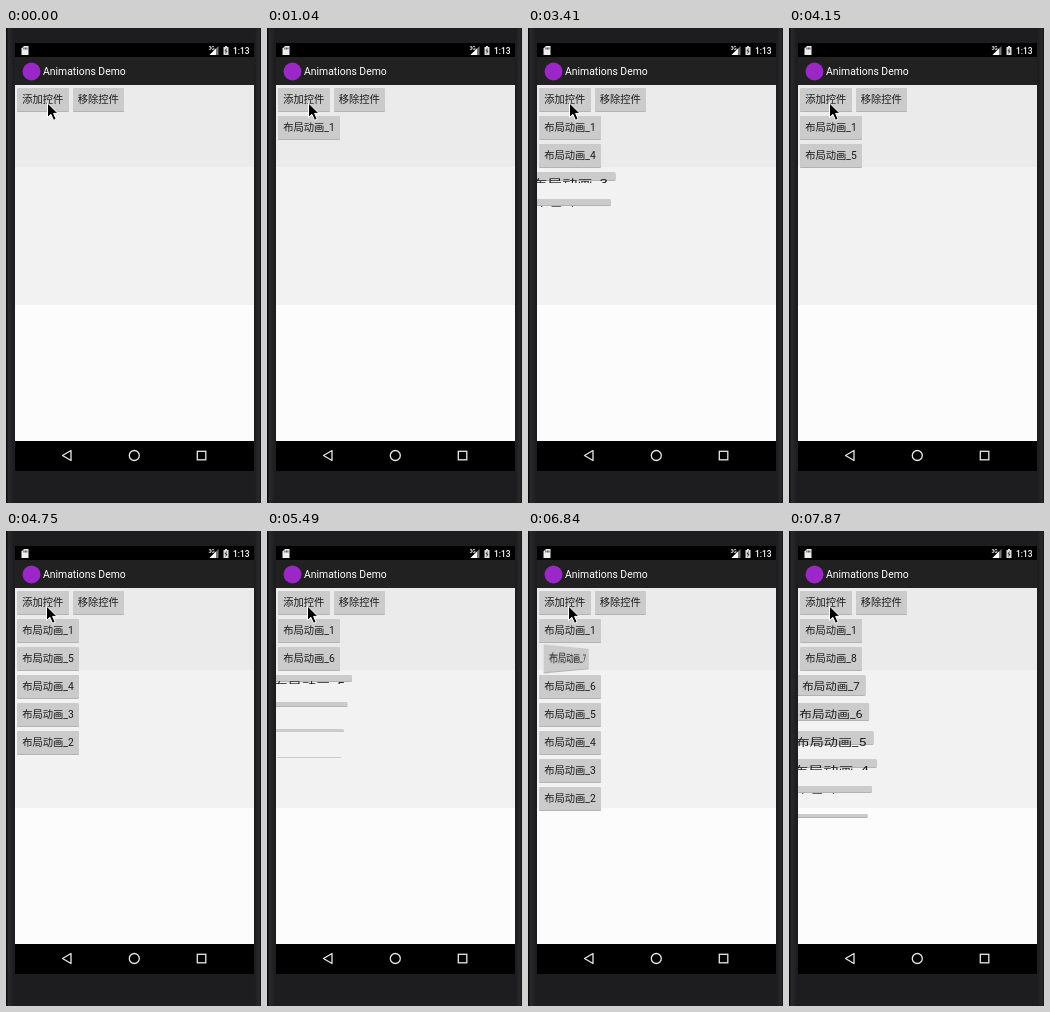
An HTML page that plays this animation: 255 by 475 pixels, repeating every 8000 ms.

```html
<!DOCTYPE html>
<html lang="zh-CN">
<head>
<meta charset="utf-8">
<title>Animations Demo</title>
<style>
  html, body { margin: 0; width: 100%; height: 100%; overflow: hidden; }
  body {
    position: relative;
    background: linear-gradient(90deg, #0c0c0d 0, #0c0c0d 1px, #2a2a2c 2px, #1d1d1f 8px, #1d1d1f 249px, #29292b 253px, #161617 255px);
    font-family: Roboto, "Noto Sans CJK SC", "Noto Sans CJK", sans-serif;
  }
  .box { position: absolute; left: 9px; width: 239px; overflow: hidden; }
  #status { top: 15px; height: 14px; background: #000; }
  #bar { top: 29px; height: 28px; background: #212121; }
  #nav { top: 413px; height: 30px; background: #000; }
  #content {
    top: 57px; height: 356px;
    background: linear-gradient(#ebebeb 82px, #f2f2f2 82px, #f2f2f2 220px, #fcfcfc 220px);
  }
  svg { position: absolute; left: 0; top: 0; }
  #clock, #title { position: absolute; color: #fff; white-space: nowrap; }
  #clock { left: 227px; top: 17px; font-size: 8.4px; line-height: 12px; font-weight: 500; }
  #title { left: 37px; top: 36px; font-size: 10.4px; line-height: 15px; }
  .view { position: absolute; left: 0; width: 66px; height: 28px; overflow: hidden; }
  .face {
    position: absolute; left: 2px; right: 2px; top: 2px; bottom: 3px;
    background: #cbcbcb; border-radius: 1px; box-shadow: 0 1px #b3b3b3;
  }
  .label {
    position: absolute; left: 0; right: 0; top: 6px; height: 15px;
    font-size: 10.3px; line-height: 15px; text-align: center; white-space: nowrap; color: #1a1a1a;
  }
</style>
</head>
<body>
<div class="box" id="status"></div>
<div class="box" id="bar"></div>
<div class="box" id="content"></div>
<div class="box" id="nav"></div>
<div id="clock">1:13</div>
<div id="title">Animations Demo</div>
<svg width="255" height="475" viewBox="0 0 255 475">
  <path d="M18 18h4.5v9h-7v-6.500z" fill="#eee"/>
  <path d="M17.900 19.500v2M19.400 19.500v2M20.900 19.500v2" stroke="#000" stroke-width=".7"/>
  <path d="M212.500 18v9h-9z" fill="#777"/>
  <path d="M210 20.500v6.500h-6.500z" fill="#fff"/>
  <text x="202.500" y="21.500" font-size="5" font-weight="500" fill="#fff">3G</text>
  <path d="M219 18h2v1h1.500v8h-5v-8h1.500z" fill="#ddd"/>
  <path d="M220.500 20.500l-1.500 2.500h2l-1.500 2.500" fill="none" stroke="#000" stroke-width=".7"/>
  <circle cx="25.500" cy="43.500" r="9" fill="#9c27c8"/>
  <g fill="none" stroke="#e8e8e8" stroke-width="1.300">
    <path d="M65 422.500v10l-8.500-5z" stroke-linejoin="round"/>
    <circle cx="128.300" cy="427.500" r="5"/>
    <rect x="191.300" y="423.300" width="8.500" height="8.500"/>
  </g>
  <path id="cursor" d="M0 0V14.500L3.400 11.300L6 17.300L8.700 16.200L6.100 10.400H10.500Z" fill="#000" stroke="#fff"/>
</svg>
<script>
  const LOOP = 8000, STEP = 148.45, ROW = 28, DUR = 300, STAGGER = 30;
  const starts = [435, 1622, 2510, 3240, 4140, 5335, 6379, 7603];
  const LEAD = 40; // a new button shows slightly before its animation clock starts
  const content = document.getElementById('content');
  const cursor = document.getElementById('cursor');

  function addView(text, left, width) {
    const el = document.createElement('div');
    el.className = 'view';
    el.innerHTML = `<div class="face"></div><div class="label">${text}</div>`;
    el.style.cssText = `left:${left}px;top:1px;width:${width}px`;
    content.append(el);
    return el;
  }

  const ease = t => (1 - Math.cos(Math.PI * Math.min(1, Math.max(0, t)))) / 2;

  function place(el, row, height, transform) {
    const face = el.firstChild.style, k = Math.min(1, height / 14);
    el.style.display = height > 0.5 ? 'block' : 'none';
    el.style.top = 1 + row * ROW + 'px';
    el.style.height = height + 'px';
    el.style.transform = transform;
    face.top = 2 * k + 'px';
    face.bottom = 3 * k + 'px';
  }

  addView('添加控件', 0, 55.5);
  addView('移除控件', 55.5, 55.5);
  const views = starts.map((_, i) => addView('布局动画_' + (i + 1), 0, 66));

  function render(time) {
    const t = Math.floor((time + 14) / STEP) * STEP;
    const count = starts.filter(s => t >= s - LEAD).length;
    const elapsed = t - starts[count - 1];

    views.forEach((el, i) => {
      const age = count - 1 - i;
      if (age < 0) return place(el, 0, 0, 'none');
      const row = i === 0 ? 1 : age + 2;
      if (age === 0) {
        // newest: full at first, then swings in from edge-on
        const spin = elapsed >= DUR && elapsed < 2 * DUR;
        const angle = 90 * (1 - ease((elapsed - DUR) / DUR));
        place(el, row, ROW, spin ? `perspective(128px) rotateY(${angle}deg)` : 'none');
      } else if (i === 0) {
        place(el, row, ROW, 'none');
      } else {
        // pushed down: grows from its new top edge while stretching sideways
        const p = ease((elapsed - STAGGER * age) / DUR);
        const scale = 1 + 0.5 * (1 - Math.abs(2 * p - 1));
        place(el, row, ROW * p, p < 1 ? `scaleX(${scale})` : 'none');
      }
    });
    cursor.setAttribute('transform', `translate(${t < 4000 ? 41.5 : 40.5} 75)`);
  }

  const origin = performance.now();
  function tick() {
    render((performance.now() - origin) % LOOP);
    requestAnimationFrame(tick);
  }
  tick();
</script>
</body>
</html>
```
